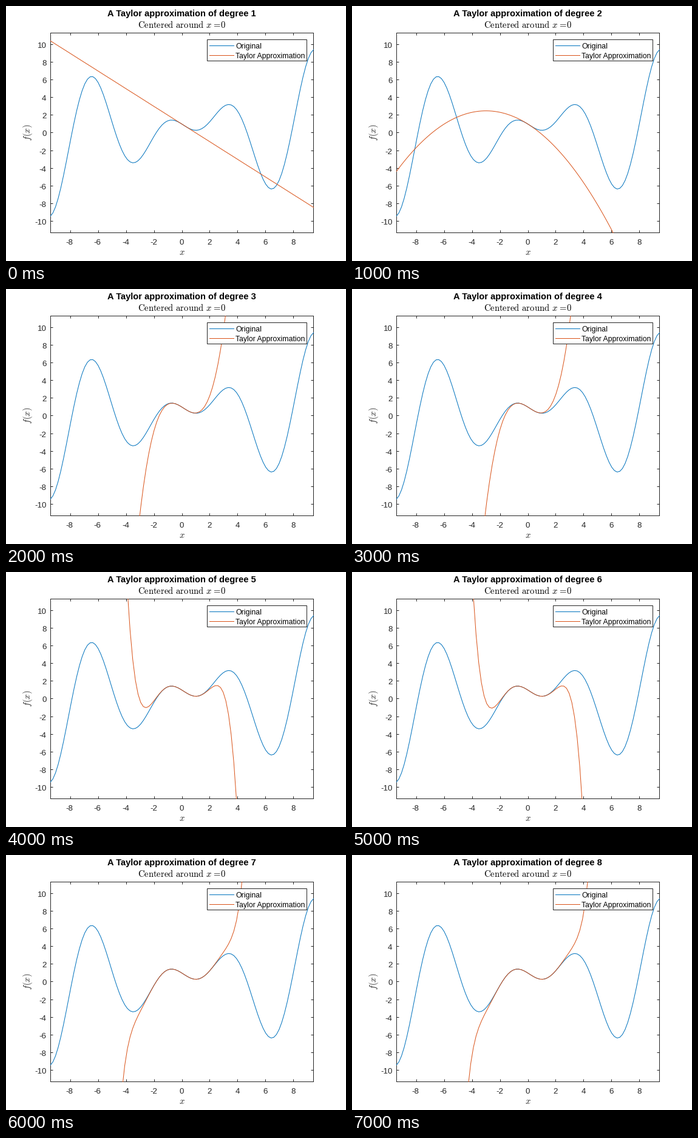
These frames come from a looping animation (560x420 px, 8 s). A matplotlib script:

```python
import math

import matplotlib.pyplot as plt
import numpy as np
from matplotlib.animation import FuncAnimation
from matplotlib.patches import Rectangle

W, H, DPI = 560, 420, 100
PX = 72 / DPI  # points per pixel
BLUE, ORANGE, INK = "#0072BD", "#D95319", "#262626"
X_MAX = 3 * math.pi
Y_MAX = 1.2 * X_MAX
X_MID, X_UNIT = 289.8, 434 / (2 * X_MAX)
Y_MID, Y_UNIT = 209.1, 329.6 / (2 * Y_MAX)

fig = plt.figure(figsize=(W / DPI, H / DPI), dpi=DPI, facecolor="white")


def add_box(left, right, top, bottom):
    """Axes over a pixel box, with the data limits of the plot."""
    box = fig.add_axes([left / W, 1 - bottom / H, (right - left) / W, (bottom - top) / H])
    box.set(xlim=(-X_MAX, X_MAX), ylim=(-Y_MAX, Y_MAX))
    return box


# The frame sits on whole pixels, the curves on the exact plot area
frame_ax = add_box(73, 506, 44, 373)
ax = add_box(X_MID - X_MAX * X_UNIT, X_MID + X_MAX * X_UNIT,
             Y_MID - Y_MAX * Y_UNIT, Y_MID + Y_MAX * Y_UNIT)
ax.axis("off")

# Overlay in pixel coordinates for the text and the legend
page = fig.add_axes([0, 0, 1, 1])
page.set(xlim=(0, W), ylim=(H, 0))
page.axis("off")


def put(x, y, text, size, ha="center", color=INK, **style):
    return page.text(x, y, text, size=size * PX, ha=ha, va="baseline", color=color,
                     family="Liberation Sans", math_fontfamily="cm", **style)


def draw_axes():
    xticks, yticks = np.arange(-8, 9, 2), np.arange(-10, 11, 2)
    frame_ax.set_xticks(xticks)
    frame_ax.set_yticks(yticks)
    frame_ax.tick_params(direction="in", length=4.3 * PX, width=PX, color=INK,
                         top=True, right=True, labelbottom=False, labelleft=False)
    for spine in frame_ax.spines.values():
        spine.set(linewidth=PX, color=INK)

    for v in xticks:
        put(X_MID - 0.8 + v * X_UNIT, 393, str(v), 13.33)
    for v in yticks:
        put(66.5, Y_MID + 5.4 - v * Y_UNIT, str(v), 13.33, ha="right")
    put(X_MID, 410, "$x$", 14.67)
    put(40, Y_MID - 1, "$f(x)$", 14.67, rotation=90, rotation_mode="anchor")


def draw_legend():
    page.add_patch(Rectangle((331, 55), 164, 35, facecolor="white",
                             edgecolor=INK, linewidth=PX))
    rows = [(65, BLUE, "Original"), (81, ORANGE, "Taylor Approximation")]
    for y, color, label in rows:
        page.plot([335, 375], [y, y], color=color, lw=PX)
        put(378, y + 5, label, 12.3, ha="left", color="black")


def taylor(x, degree):
    """Partial sum of sin(x)/x - x cos(x) around zero."""
    total = np.zeros_like(x)
    for k in range(degree + 1):
        sign = (-1) ** (k // 2)
        if k % 2:
            coef = -sign / math.factorial(k - 1)
        else:
            coef = sign / math.factorial(k + 1)
        total += coef * x ** k
    return total


draw_axes()
draw_legend()
title = put(289.5, 17, "", 14.67, color="black", weight="bold")
put(289.3, 36, r"$\mathrm{Centered}\hspace{0.38}\mathrm{around}\hspace{0.38}"
    r"x\hspace{0.116}=\hspace{-0.2}0$", 14.67, color="black")

x = np.linspace(-X_MAX, X_MAX, 100)
ax.plot(x, np.sinc(x / math.pi) - x * np.cos(x), color=BLUE, lw=PX)
approx, = ax.plot([], [], color=ORANGE, lw=PX)


def update(frame):
    degree = frame + 1
    title.set_text(f"A Taylor approximation of degree {degree}")
    approx.set_data(x, taylor(x, degree))
    return title, approx


anim = FuncAnimation(fig, update, frames=8, interval=1000, repeat=True, repeat_delay=0)
plt.show()
```
